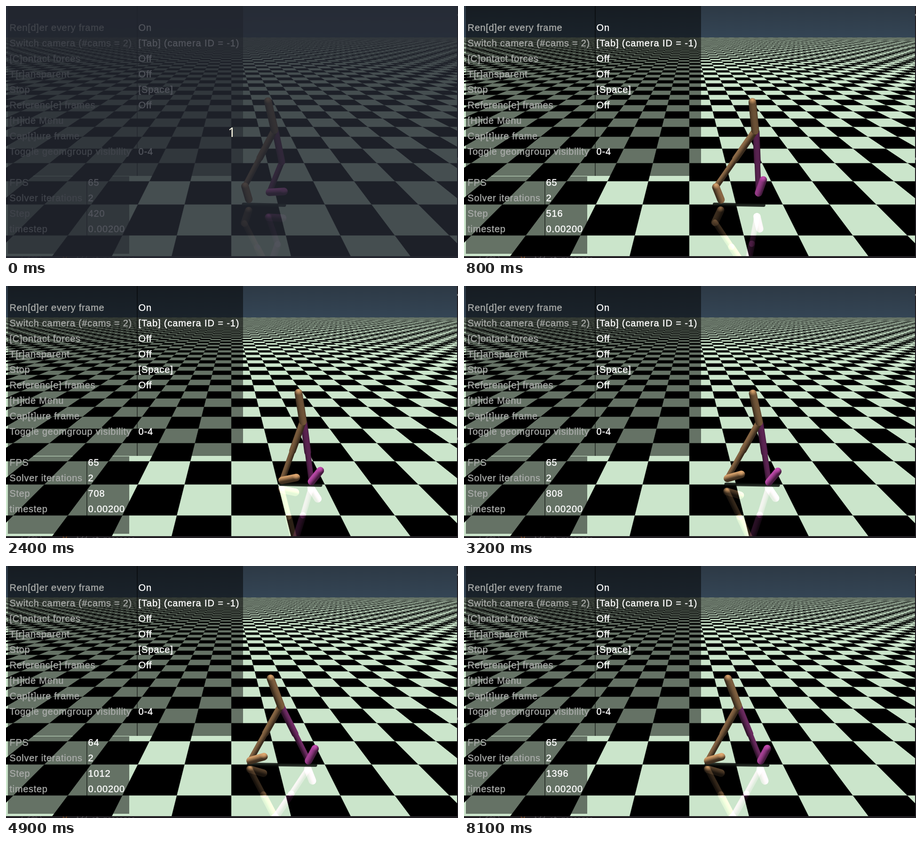
Recreate the animation shown at these times as an HTML page with a canvas. Size 961 by 537 pixels, loop 8200 ms.

```html
<!DOCTYPE html>
<html>
<head>
<meta charset="utf-8">
<style>
html, body { margin: 0; width: 100%; height: 100%; overflow: hidden; background: #221f24; }
canvas { display: block; }
</style>
</head>
<body>
<canvas id="stage" width="961" height="537"></canvas>
<script>
const W = 961, H = 537, LOOP = 8200, FLOOR_W = 959, FLOOR_H = 533;
const HORIZON = 25.5, FLOOR_TOP = 67, CENTER = 479, GROUND = 424;
const ROW_STEP = 0.0003583;
const ORANGE = [204, 153, 102], PURPLE = [180, 70, 162];
const LABEL = '#a8aaa8', VALUE = '#fff';
const ctx = document.getElementById('stage').getContext('2d');

const ramp = (t, a, b) => Math.min(1, Math.max(0, (t - a) / (b - a)));
const easeOut = (t, a, b) => 1 - (1 - ramp(t, a, b)) ** 2;

// The body swings forward, sinks onto its feet, rocks back and settles
function poseAt(t) {
  const swing = easeOut(t, 0, 1700), kick = ramp(t, 0, 800), stride = ramp(t, 0, 2300);
  const sink = ramp(t, 700, 2500), rock = easeOut(t, 1700, 3600), back = easeOut(t, 2500, 3900);
  const settle = easeOut(t, 3900, 5100), slide = ramp(t, 4700, 5400);

  const head = [557 + 78 * swing - 22 * rock - 52 * settle, 203 + 26 * sink + 11 * settle];
  const hip = [571 + 67 * swing - 11 * rock - 44 * settle, 264 + 26 * sink + 8 * settle];
  const near = [508 + 79 * stride - 36 * back - 33 * settle, 384 + 32 * sink - 8 * back + 7 * settle];
  const far = [560 + 92 * swing - 4 * rock - 17 * slide, 397 + 21 * sink - 3 * settle];
  return {
    head, hip,
    near: leg(hip, near, 0, 1.3 - 1.6 * sink),
    far: leg([hip[0] + 2, hip[1] + 3], far, 20 * (1 - kick), -0.06 - 1.2 * kick + 0.35 * sink - 0.2 * settle)
  };
}

function leg(hip, ankle, bend, angle) {
  return [
    hip,
    [(hip[0] + ankle[0]) / 2 + bend, (hip[1] + ankle[1]) / 2],
    ankle,
    [ankle[0] + 31 * Math.cos(angle), ankle[1] + 29 * Math.sin(angle)]
  ];
}

const shade = (rgb, k, alpha = 1) =>
  `rgba(${rgb.map(c => Math.min(255, Math.round(c * k))).join()},${alpha})`;

function rect(g, x, y, w, h, fill) {
  g.fillStyle = fill;
  g.fillRect(x, y, w, h);
}

function text(g, str, x, row, color) {
  const y = 53 + 33 * row;
  g.font = '20px "Liberation Sans", sans-serif';
  g.letterSpacing = color === VALUE ? '0.9px' : '0.7px';
  g.fillStyle = g.strokeStyle = color;
  g.lineWidth = 0.4;
  g.fillText(str, x, y);
  g.strokeText(str, x, y);
}

// Mean of a +1/-1 square wave of period 2 over [a, b]
function meanSquare(a, b) {
  const area = u => 1 - Math.abs(u - 2 * Math.floor(u / 2) - 1);
  return (area(b) - area(a)) / (b - a);
}

function paintFloor(g) {
  const img = g.createImageData(FLOOR_W, FLOOR_H - FLOOR_TOP);
  const depth = y => (1 / (y - HORIZON) - 1 / (423 - HORIZON)) / ROW_STEP + 1;
  for (let y = FLOOR_TOP, p = 0; y < FLOOR_H; y++) {
    const row = meanSquare(depth(y + 1.2), depth(y - 0.2));
    const cell = 0.25 * (y + 0.5 - HORIZON);
    for (let x = 0; x < FLOOR_W; x++) {
      const u = x + 0.5 - CENTER;
      const light = 0.5 - 0.5 * row * meanSquare((u - 0.7) / cell, (u + 0.7) / cell);
      img.data[p++] = 203 * light;
      img.data[p++] = 229 * light;
      img.data[p++] = 203 * light;
      img.data[p++] = 255;
    }
  }
  g.putImageData(img, 0, FLOOR_TOP);
}

function paintBackdrop() {
  const c = document.createElement('canvas');
  c.width = W;
  c.height = H;
  const g = c.getContext('2d');
  rect(g, 0, 0, W, H, '#221f24');
  const sky = g.createLinearGradient(0, 0, 0, FLOOR_TOP);
  sky.addColorStop(0, '#2d3945');
  sky.addColorStop(1, '#344555');
  rect(g, 0, 0, FLOOR_W, FLOOR_TOP, sky);
  paintFloor(g);
  rect(g, 959, 17, 2, 4, '#777');
  rect(g, 959, 323, 2, 5, '#777');

  // Terminal line peeking out below the window
  g.save();
  g.beginPath();
  g.rect(0, 533, W, 4);
  g.clip();
  g.font = '14px "DejaVu Sans Mono", monospace';
  g.fillStyle = '#5a565c';
  g.fillText('/ 68%)', 28, 544);
  g.fillText('Add st:messages', 148, 544);
  g.fillStyle = '#a8622c';
  g.fillText('W:', 121, 544);
  g.restore();

  const veil = 'rgba(0,0,0,0.5)';
  rect(g, 4, 0, 500, 362, veil);
  rect(g, 278, 0, 2, 362, veil);
  rect(g, 4, 363, 258, 165, veil);
  rect(g, 171, 363, 2, 165, veil);
  const menu = [
    ['Ren[d]er every frame', 'On'],
    ['Switch camera (#cams = 2)', '[Tab] (camera ID = -1)'],
    ['[C]ontact forces', 'Off'],
    ['T[r]ansparent', 'Off'],
    ['Stop', '[Space]'],
    ['Referenc[e] frames', 'Off'],
    ['[H]ide Menu', ''],
    ['Cap[t]ure frame', ''],
    ['Toggle geomgroup visibility', '0-4']
  ];
  menu.forEach(([label, value], i) => {
    text(g, label, 7.5, i, LABEL);
    text(g, value, 281.5, i, VALUE);
  });
  ['FPS', 'Solver iterations', 'Step', 'timestep'].forEach((label, i) =>
    text(g, label, 7.5, 10 + i, LABEL));
  return c;
}

// Capsule lit from above, seen by a camera that looks slightly down
function limb(a, b, r, rgb, gain, shiny) {
  const dx = b[0] - a[0], dy = b[1] - a[1], len = Math.hypot(dx, dy) || 1;
  const nx = -dy / len, ny = dx / len;
  const fill = ctx.createLinearGradient(a[0] - nx * r, a[1] - ny * r, a[0] + nx * r, a[1] + ny * r);
  for (let u = -1; u <= 1; u += 0.25) {
    const lit = Math.max(0, 0.33 * Math.sqrt(1 - u * u) - 0.94 * u * ny);
    fill.addColorStop((u + 1) / 2, shade(rgb, gain * (0.3 + 0.75 * lit)));
  }
  ctx.strokeStyle = fill;
  ctx.lineWidth = 2 * r;
  ctx.lineCap = 'round';
  ctx.beginPath();
  ctx.moveTo(...a);
  ctx.lineTo(...b);
  ctx.stroke();
  if (!shiny) return;
  const [x, y] = a[1] < b[1] ? a : b;
  const glow = ctx.createRadialGradient(x, y - r * 0.6, 0, x, y - r * 0.6, r * 1.2);
  glow.addColorStop(0, shade(rgb, 1.1));
  glow.addColorStop(1, shade(rgb, 1.1, 0));
  ctx.fillStyle = glow;
  ctx.beginPath();
  ctx.arc(x, y, r, 0, 7);
  ctx.fill();
}

function drawLeg([hip, knee, ankle, toe], rgb, gain, footGain) {
  limb(knee, ankle, 6, rgb, gain);
  limb(hip, knee, 7.2, rgb, gain);
  limb(ankle, toe, 8, rgb, footGain, true);
}

function walker(pose, place = p => p) {
  drawLeg(pose.far.map(place), PURPLE, 0.9, 1.3);
  drawLeg(pose.near.map(place), ORANGE, 0.92, 1.05);
  limb(place(pose.head), place(pose.hip), 8.3, ORANGE, 0.95, true);
}

function mirror([x, y]) {
  const h = GROUND - y, s = 1 - 0.0009 * h;
  return [CENTER + (x - CENTER) * s, GROUND + h * s];
}

function shadow(pose) {
  const xs = [...pose.near, ...pose.far].map(p => p[0]);
  ctx.strokeStyle = 'rgba(14,18,14,0.88)';
  ctx.lineWidth = 7;
  ctx.lineCap = 'round';
  ctx.beginPath();
  ctx.moveTo(Math.min(...xs) - 3, 422.5);
  ctx.lineTo(Math.max(...xs) + 1, 424.5);
  ctx.stroke();
}

const backdrop = paintBackdrop();

function draw(now) {
  const t = Math.floor(now % LOOP / 100) * 100;
  const pose = poseAt(t);
  ctx.drawImage(backdrop, 0, 0);

  ctx.save();
  ctx.beginPath();
  ctx.rect(0, 0, FLOOR_W, FLOOR_H);
  ctx.clip();
  ctx.globalCompositeOperation = 'lighter';
  ctx.globalAlpha = 0.4;
  walker(pose, mirror);
  ctx.restore();
  shadow(pose);
  walker(pose);

  const fps = t < 4600 || t >= 7000 ? 65 : t < 5500 ? 64 : 63;
  const step = 420 + t * 0.12 + (t >= 3100 ? 4 : 0);
  [fps, 2, Math.round(step), '0.00200'].forEach((v, i) =>
    text(ctx, String(v), 174.5, 10 + i, VALUE));

  // Countdown veil of the screen recorder
  if (t === 0) {
    rect(ctx, 0, 0, W, H, 'rgba(37,41,50,0.8)');
    ctx.font = '28px "Noto Sans", sans-serif';
    ctx.letterSpacing = '0px';
    ctx.fillStyle = '#fffbe6';
    ctx.textAlign = 'center';
    ctx.fillText('1', 480, 279);
    ctx.textAlign = 'left';
  }
}

const start = performance.now();
function tick() {
  draw(performance.now() - start);
  requestAnimationFrame(tick);
}
tick();
</script>
</body>
</html>
```
